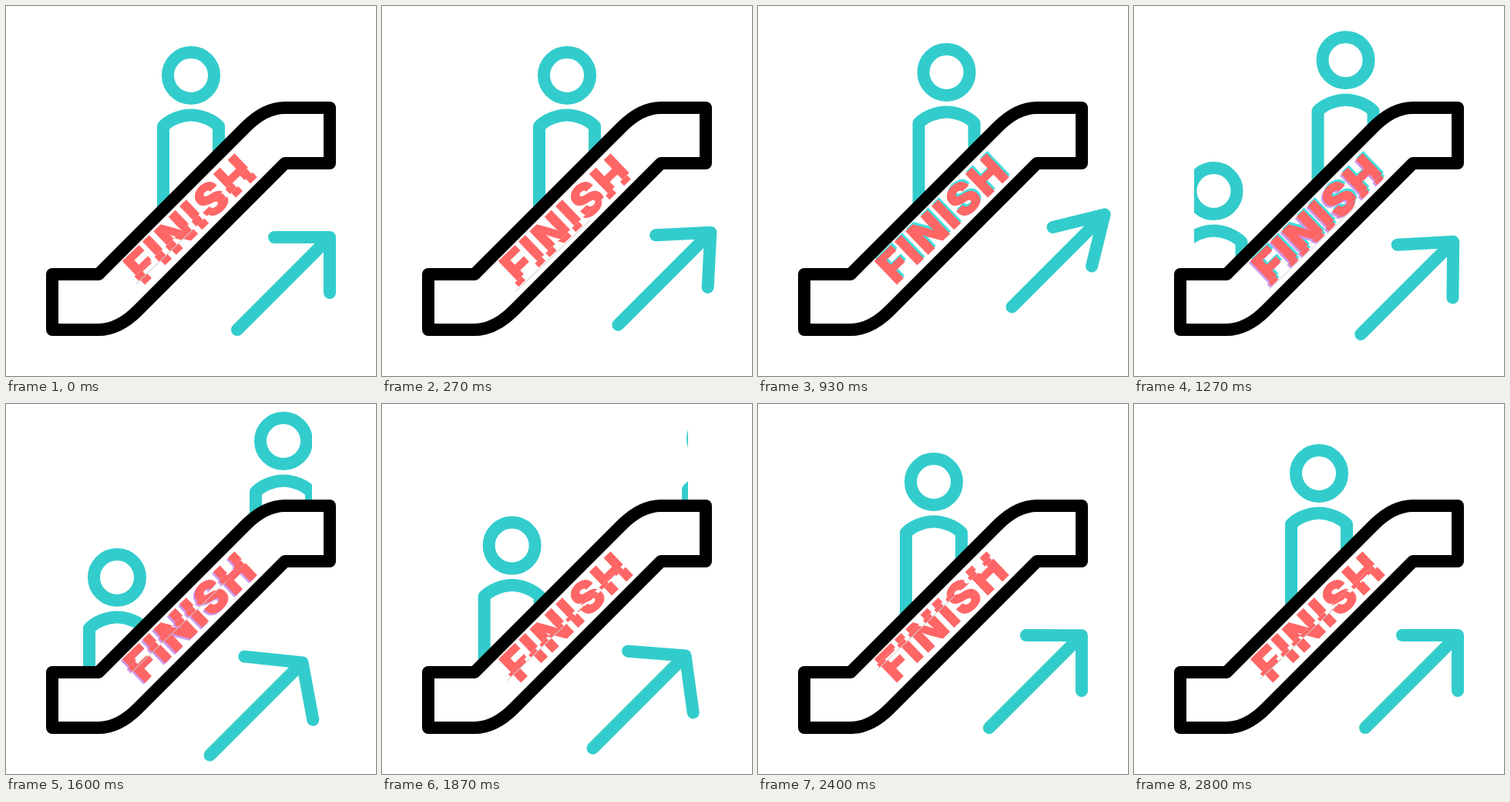
Write an HTML page that moves like this. It is 480 by 480 pixels and loops after 2.87 s.

```html
<!DOCTYPE html>
<html lang="en">
<head>
<meta charset="utf-8">
<title>Escalator</title>
<style>
  html, body { margin: 0; width: 100%; height: 100%; overflow: hidden; background: #fff; }
  svg { display: block; width: 100%; height: 100%; }
  .line { fill: none; stroke: #3cc; stroke-width: 16; stroke-linejoin: round; }
  .round { stroke-linecap: round; }
  text {
    font: 900 57px Inter, Lato, "Open Sans", sans-serif;
    letter-spacing: 3px; text-anchor: middle;
    fill: currentColor; stroke: currentColor; stroke-width: 1;
  }
</style>
</head>
<body>
<svg viewBox="0 0 480 480">
  <defs>
    <clipPath id="ride"><path d="M78 0H397V170H330L120 380H78Z"/></clipPath>
    <clipPath id="restClip"><rect id="above" x="-40" width="300"/><rect id="below" x="-40" width="300"/></clipPath>
    <clipPath id="bandClip"><rect id="band" x="-40" width="300"/></clipPath>
    <g id="person" class="line">
      <circle r="30"/>
      <path d="M-36 200V66C-28 58 -14 51.5 0 51.5S28 58 36 66V200"/>
    </g>
    <g id="word">
      <text id="cyan" x="108" y="-1.5" color="#4dd">FINISH</text>
      <text id="purple" x="102" y="0.5" color="#c9e">FINISH</text>
      <text x="105" color="#f66">FINISH</text>
    </g>
  </defs>
  <g clip-path="url(#ride)">
    <use id="leaving" href="#person"/>
    <use id="arriving" href="#person"/>
  </g>
  <path d="M60 348H120L311 157Q336 132 362 132H420V204H362L171 395Q146 420 120 420H60Z"
        fill="#fff" stroke="#000" stroke-width="16" stroke-linejoin="round"/>
  <g transform="translate(178 363) rotate(-43.8)">
    <g clip-path="url(#restClip)"><use href="#word"/></g>
    <g id="slice"><g clip-path="url(#bandClip)"><use href="#word"/></g></g>
    <rect id="scratch" height="1.2" fill="#ccc"/>
  </g>
  <path id="arrow" class="line round"/>
</svg>
<script>
const LOOP = 2870, STEP = 200 / 3, STEPS = 43;
const $ = id => document.getElementById(id);
const set = (id, attrs) => { for (const k in attrs) $(id).setAttribute(k, attrs[k]); };
const smooth = u => u * u * (3 - 2 * u);
const noise = n => { const v = Math.sin(n * 91.7) * 4375.5; return v - Math.floor(v); };

// Key points: [time, x, y].
const leavingPath = [[730, 240, 90], [1270, 275, 70], [1600, 360, 48], [1870, 434, 45], [2000, 470, 45]];
const arrivingPath = [[730, 10, 243], [1270, 104, 240], [1600, 144, 225], [1870, 169, 183], [2400, 228, 101], [2600, 240, 90]];

// Key poses: [time, diagonal travel, left barb angle, lower barb angle].
const arrowPoses = [[0, 0, 0, 0], [900, 30, 14, 14], [1590, -35.5, -6, -10.5], [2430, 0, 0, 0]];

function segment(keys, t) {
  let i = 0;
  while (i < keys.length - 2 && t >= keys[i + 1][0]) i++;
  const u = (t - keys[i][0]) / (keys[i + 1][0] - keys[i][0]);
  return [i, Math.min(1, Math.max(0, u))];
}

// Cubic Hermite curve through the keys, at rest at both ends.
function along(keys, t) {
  const [i, u] = segment(keys, t), a = keys[i], b = keys[i + 1], span = b[0] - a[0];
  const slope = (j, k) => j === 0 || j === keys.length - 1 ? 0
    : (keys[j + 1][k] - keys[j - 1][k]) / (keys[j + 1][0] - keys[j - 1][0]);
  return [1, 2].map(k => a[k] + (b[k] - a[k]) * smooth(u)
    + span * u * (1 - u) * ((1 - u) * slope(i, k) - u * slope(i + 1, k)));
}

function drawArrow(t) {
  const [i, u] = segment(arrowPoses, t);
  const [, travel, left, lower] = arrowPoses[i].map((v, k) => v + (arrowPoses[i + 1][k] - v) * smooth(u));
  const x = 420 + travel, y = 300 - travel, length = 72 - travel * 0.1;
  const barb = degrees => {
    const a = degrees * Math.PI / 180;
    return `${x + length * Math.cos(a)} ${y + length * Math.sin(a)}`;
  };
  set("arrow", { d: `M${x - 120} ${y + 120}L${x} ${y}M${barb(180 - left)}L${x} ${y}L${barb(90 + lower)}` });
}

// A torn band sweeps down the word three times per loop, pausing while only the cyan ghost shows.
function drawWord(step, t) {
  const sweep = STEPS / 3, phase = (step - 19 + STEPS) % sweep;
  const calm = t > 500 && t < 1000;
  const top = -41 + 2.5 * phase;
  const height = calm ? 0 : 4 + 6 * noise(step + 1);
  const shift = calm ? 0 : -2 - 3 * noise(step + 7);
  set("above", { y: -70, height: top + 70 });
  set("band", { y: top, height });
  set("below", { y: top + height, height: 40 - top - height });
  set("slice", { transform: `translate(${shift} 0)` });
  set("scratch", { x: shift * 2, y: top + height - 0.6, width: 100 + 80 * noise(step), opacity: calm ? 0 : 0.75 });
  set("cyan", { opacity: +(t > 500 && t < 1400) });
  set("purple", { opacity: +(t > 1200 && t < 1700) });
}

function draw(time) {
  const step = Math.min(STEPS - 1, Math.floor((time + 3.4) / STEP)), t = step * STEP;
  set("leaving", { transform: `translate(${along(leavingPath, t)})` });
  set("arriving", { transform: `translate(${along(arrivingPath, t)})` });
  drawArrow(t);
  drawWord(step, t);
}

const begin = performance.now();
function tick() {
  draw((performance.now() - begin) % LOOP);
  requestAnimationFrame(tick);
}
tick();
</script>
</body>
</html>
```
